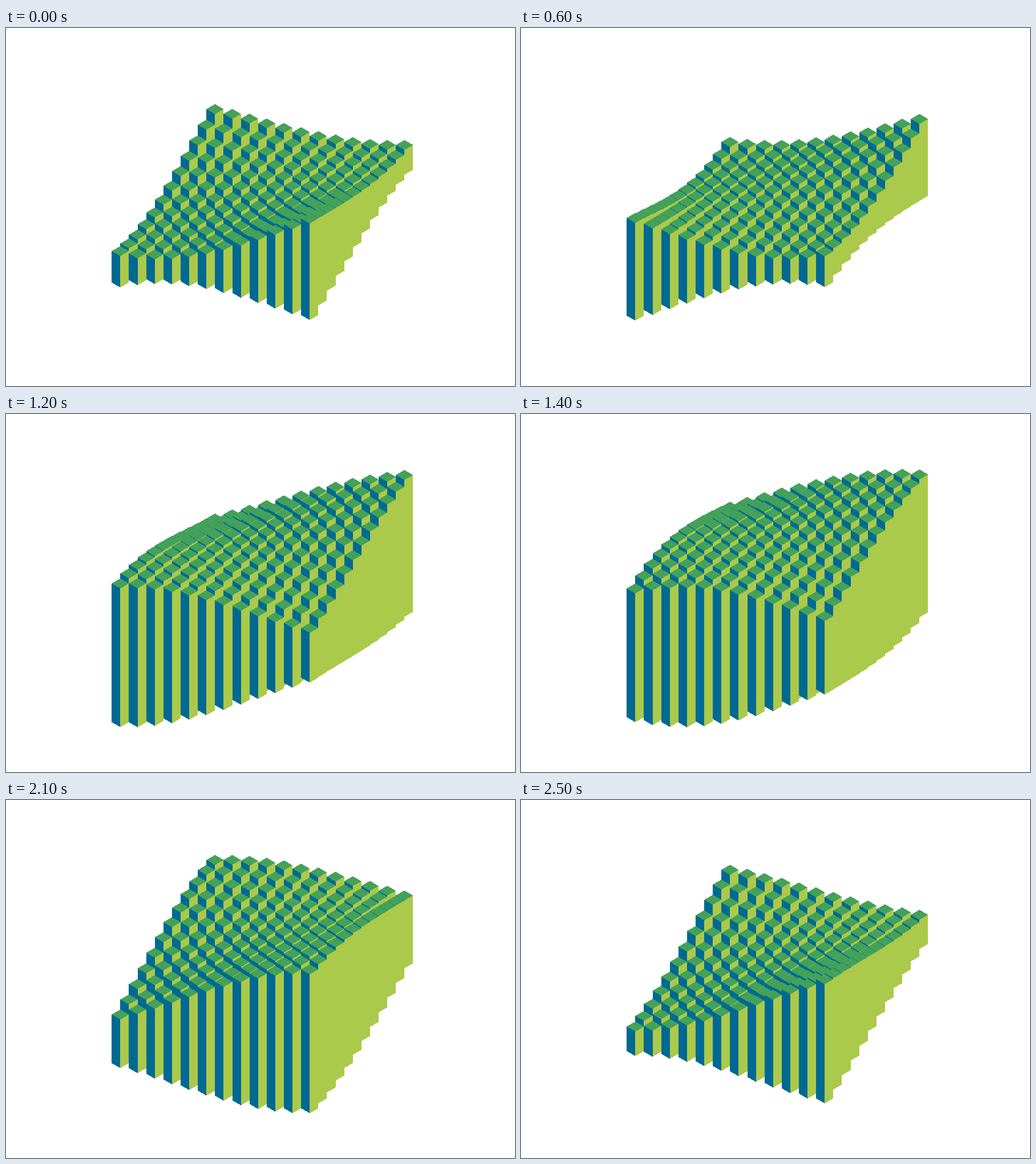
Animation of 892x627 px, one loop 2600 ms. Source, as an HTML page:

```html
<!DOCTYPE html>
<html lang="en">
<head>
<meta charset="utf-8">
<title>Isometric wave</title>
<style>
  html, body { margin: 0; width: 100%; height: 100%; overflow: hidden; background: #fff; }
  svg { display: block; width: 892px; height: 627px; }
  .top { fill: #43a15a; }
  .left { fill: #006992; }
  .right { fill: #abc94a; }
</style>
</head>
<body>
<svg id="stage" viewBox="0 0 892 627" shape-rendering="crispEdges"></svg>
<script>
const SIZE = 12;                         // bars per side
const HALF_W = 15.086, HALF_H = 8.71;    // half of a bar's diamond
const ORIGIN = { x: 200.4, y: 418.25 };
const LOW = 21.5, RISE = 100.4;          // half height of a bar: least, and gain at the crest
const STEP_MS = 100, STEPS = 26;
const TURN = 2 / 27;                     // phase gained per step, in half waves
const PHASE = 0.748, TWIST = 0.01114;

const stage = document.getElementById('stage');

function addPath(name) {
  const path = document.createElementNS('http://www.w3.org/2000/svg', 'path');
  path.setAttribute('class', name);
  return stage.appendChild(path);
}

function setPoints(path, points) {
  path.setAttribute('d', 'M' + points.map(p => p.map(n => n.toFixed(2)).join(' ')).join('L') + 'Z');
}

// Eased up-and-down wave: 1 at even phases, 0 at odd ones.
function wave(phase) {
  const s = Math.abs(1 - (phase % 2));
  return s * s * (3 - 2 * s);
}

// Back rows come first so that nearer bars cover them.
const bars = [];
for (let row = SIZE - 1; row >= 0; row--) {
  for (let col = 0; col < SIZE; col++) {
    bars.push({
      x: ORIGIN.x + (2 * col + row) * HALF_W,
      y: ORIGIN.y - 2 * row * HALF_H,
      phase: PHASE + TWIST * (col - SIZE / 2) * (row - SIZE / 2),
      left: addPath('left'),
      right: addPath('right'),
      top: addPath('top')
    });
  }
}

function drawBar(bar, step) {
  const half = LOW + RISE * wave(bar.phase + TURN * step);
  const { x, y } = bar;
  const x1 = x - HALF_W, x2 = x + HALF_W;
  const up = y - half, down = y + half;
  setPoints(bar.left, [[x1, up], [x, up + HALF_H], [x, down + HALF_H], [x1, down]]);
  setPoints(bar.right, [[x, up + HALF_H], [x2, up], [x2, down], [x, down + HALF_H]]);
  setPoints(bar.top, [[x1, up], [x, up - HALF_H], [x2, up], [x, up + HALF_H]]);
}

let shown = -1;
function render(ms) {
  const step = Math.floor(Math.max(0, ms) / STEP_MS) % STEPS;
  if (step === shown) return;
  shown = step;
  for (const bar of bars) drawBar(bar, step);
}

const start = performance.now();
function tick() {
  render(performance.now() - start);
  requestAnimationFrame(tick);
}
tick();
</script>
</body>
</html>
```
